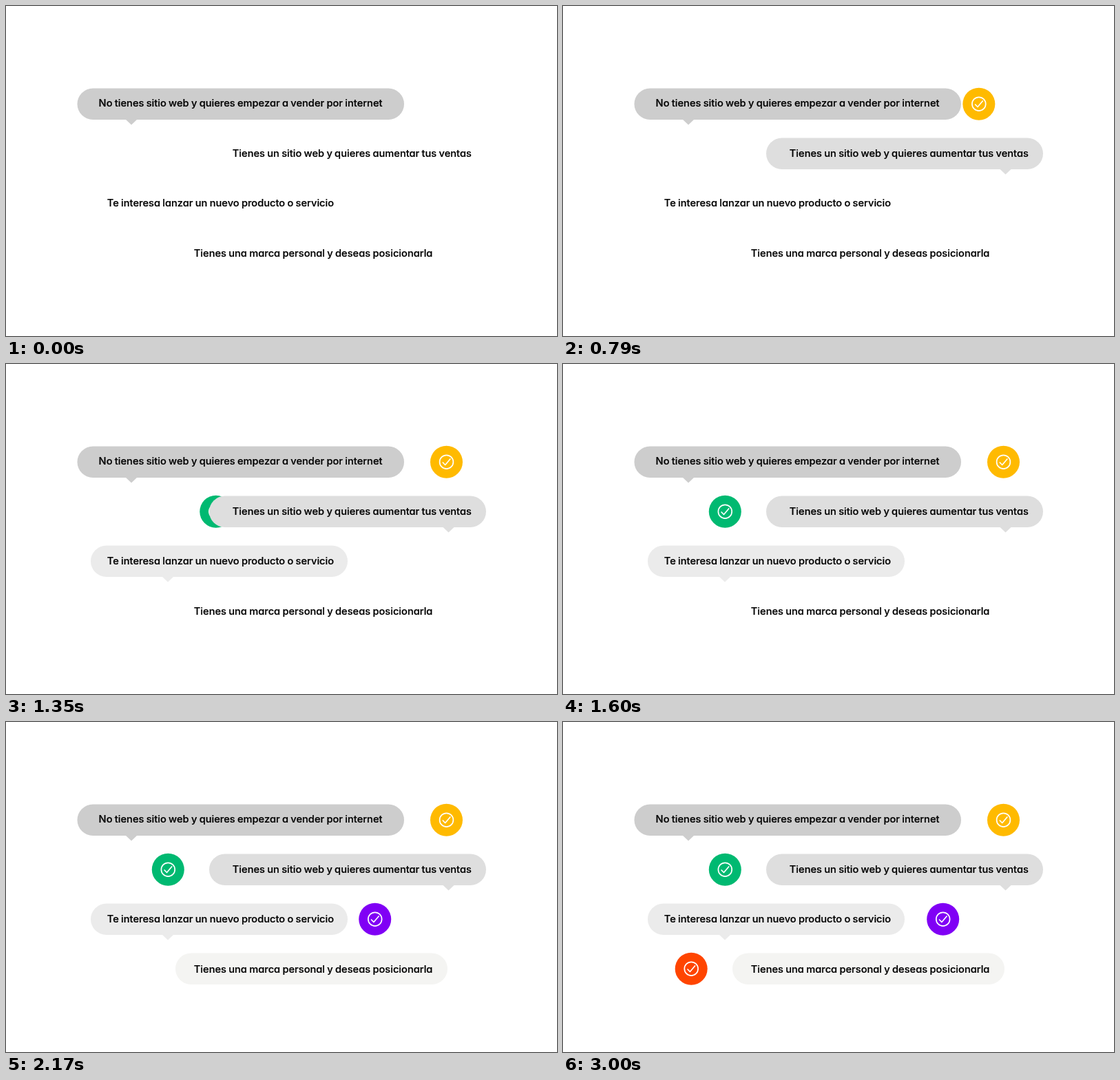
Recreate the animation shown at these times as an HTML page. Size 800 px wide and 479 px high, loop 4.9 s.

```html
<!DOCTYPE html>
<html lang="es">
<head>
<meta charset="utf-8">
<style>
  html, body { margin: 0; width: 100%; height: 100%; overflow: hidden; background: #fff; }
  svg { display: block; width: 800px; height: 479px; }
  text {
    font: 500 14.65px Inter, sans-serif; font-feature-settings: "cv11";
    word-spacing: -.6px; stroke: #000; stroke-width: .2;
  }
  .icon { fill: none; stroke: #fff; stroke-width: 1.7; stroke-linecap: round; stroke-linejoin: round; }
</style>
</head>
<body>
<svg id="stage" viewBox="0 0 800 479"></svg>
<script>
const LOOP = 4900, SLIDE = 330;

// shown: when the bubble appears; event: when its badge appears; slide: when the badge starts to move out
const rows = [
  { text: 'No tienes sitio web y quieres empezar a vender por internet', textX: 134.6, base: 146,
    left: 103.5, right: 578, top: 119.5, tail: 182, fill: '#cdcdcd', shown: 0,
    badge: '#ffba00', from: 555, to: 639.5, event: 540, slide: 611 },
  { text: 'Tienes un sitio web y quieres aumentar tus ventas', textX: 328.8, base: 218.5,
    left: 295, right: 697, top: 191.5, tail: 642.5, fill: '#dedede', shown: 540,
    badge: '#00b971', from: 318.5, to: 235.3, event: 1250, slide: 1258 },
  { text: 'Te interesa lanzar un nuevo producto o servicio', textX: 146.8, base: 290.5,
    left: 123, right: 496, top: 263.5, tail: 235, fill: '#ebebeb', shown: 1250,
    badge: '#8000f5', from: 473, to: 551.7, event: 1940, slide: 1944 },
  { text: 'Tienes una marca personal y deseas posicionarla', textX: 272.8, base: 363.7,
    left: 246, right: 641, top: 335.5, fill: '#f4f4f2', shown: 1940,
    badge: '#ff4500', from: 270.5, to: 186.2, event: 2640, slide: 2644 }
];

const stage = document.getElementById('stage');
stage.innerHTML = rows.map(r => `
  <g class="badge">
    <circle r="23.5" fill="${r.badge}"/>
    <g class="icon"><circle r="9.9"/><path d="M-5.2 .8L-1.8 4.3 5.4-4.2"/></g>
  </g>
  <g class="bubble" fill="${r.fill}">
    <rect x="${r.left}" y="${r.top}" width="${r.right - r.left}" height="45.5" rx="22.75"/>
    ${r.tail ? `<path d="M${r.tail - 8.5} ${r.top + 45}h17l-8.5 8z"/>` : ''}
  </g>
  <text x="${r.textX}" y="${r.base}">${r.text}</text>`).join('');

const badges = stage.querySelectorAll('.badge');
const bubbles = stage.querySelectorAll('.bubble');

// cubic-bezier(.42, 0, .58, 1), solved by bisection
function easeInOut(x) {
  if (x <= 0) return 0;
  if (x >= 1) return 1;
  let lo = 0, hi = 1, u;
  for (let i = 0; i < 20; i++) {
    u = (lo + hi) / 2;
    const bx = 3 * u * (1 - u) * (.42 * (1 - u) + .58 * u) + u ** 3;
    if (bx < x) lo = u; else hi = u;
  }
  return u * u * (3 - 2 * u);
}

function draw() {
  const t = performance.now() % LOOP;
  rows.forEach((r, i) => {
    const x = r.from + (r.to - r.from) * easeInOut((t - r.slide) / SLIDE);
    badges[i].setAttribute('transform', `translate(${x} ${r.top + 22.7})`);
    badges[i].style.display = t < r.event ? 'none' : '';
    bubbles[i].style.display = t < r.shown ? 'none' : '';
  });
  requestAnimationFrame(draw);
}
draw();
</script>
</body>
</html>
```
